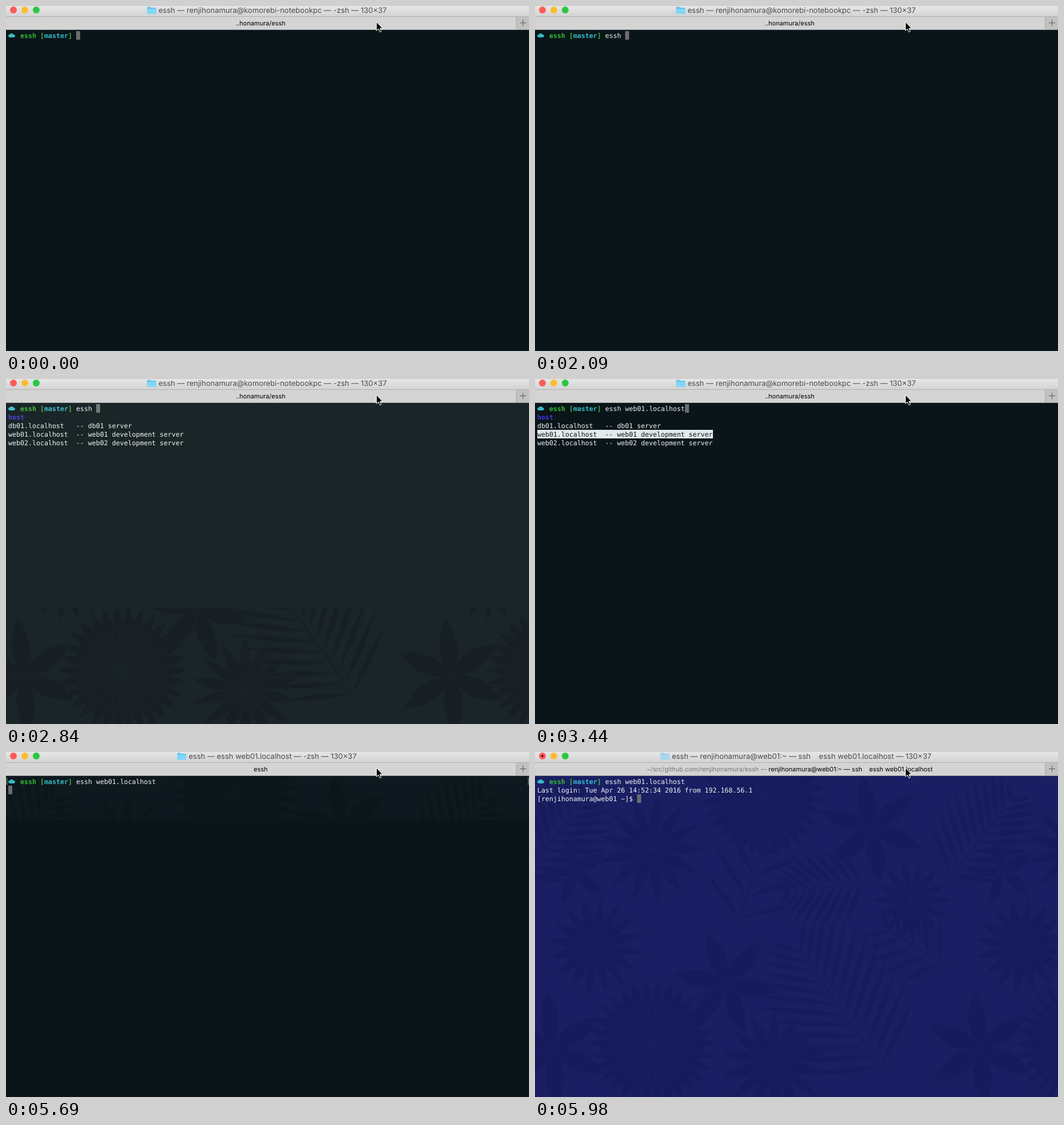
These frames come from a looping animation (917 px wide and 604 px high, 8 s). An HTML page:

```html
<!DOCTYPE html>
<html lang="en">
<head>
<meta charset="utf-8">
<title>Terminal session</title>
<style>
html, body { margin: 0; width: 100%; height: 100%; overflow: hidden; background: #0a1519; }
svg { display: block; }
text { white-space: pre; text-rendering: geometricPrecision; }
.ui { font-family: Inter, "Open Sans", sans-serif; text-anchor: middle; }
#title { font-size: 13px; fill: #4a4a4a; }
#tab { font-size: 11px; fill: #000; }
#screen { font: 11.628px "DejaVu Sans Mono", monospace; fill: #f1f4f4; }
.b { font-weight: bold; }
</style>
</head>
<body>
<svg width="917" height="604" viewBox="0 0 917 604">
  <defs>
    <linearGradient id="bar" x2="0" y2="1">
      <stop stop-color="#e6e6e6"/><stop offset="1" stop-color="#d3d3d3"/>
    </linearGradient>
    <clipPath id="clip"><rect id="clipBox" width="917"/></clipPath>
  </defs>

  <rect width="917" height="604" fill="#0a1519"/>
  <g id="foliage" clip-path="url(#clip)">
    <rect id="ground" y="42" width="917" height="562" stroke="none"/>
    <g id="tile"></g>
    <use href="#tile" x="750"/>
    <use href="#tile" x="-750"/>
  </g>
  <g id="screen"></g>
  <rect id="flash" y="42" width="917" height="562" fill="#fff"/>

  <rect width="917" height="18" fill="url(#bar)"/>
  <rect y="18" width="917" height="24" fill="#d4d4d4"/>
  <rect x="894" y="18" width="23" height="24" fill="#c1c1c1"/>
  <path d="M0 18.5H917M894.5 18V42" stroke="#b0b0b0"/>
  <path d="M0 41.5H917" stroke="#9c9c9c"/>
  <path d="M901 29.5H912M906.5 24V35" stroke="#5a5a5a"/>
  <circle cx="13" cy="7" r="6" fill="#fc5b57"/>
  <circle id="dot" cx="13" cy="7" r="2" fill="#5a0906"/>
  <circle cx="33" cy="7" r="6" fill="#fdbc2f"/>
  <circle cx="53" cy="7" r="6" fill="#29c840"/>
  <g id="folder">
    <path d="M0 3q0-1.5 1.5-1.5H5.5L7 3H14.5Q16 3 16 4.5V12Q16 13.5 14.5 13.5H1.5Q0 13.5 0 12Z" fill="#62c3ee"/>
    <path d="M0 5H16V12Q16 13.5 14.5 13.5H1.5Q0 13.5 0 12Z" fill="#84d6f9"/>
  </g>
  <text id="title" class="ui" x="467.5" y="12"></text>
  <text id="tab" class="ui" x="446.5" y="34"></text>
  <path d="M649.5 28V43.2L653 40L655.5 45.6L658 44.5L655.6 39.1H660.3Z" fill="#000" stroke="#fff"/>
</svg>

<script>
const $ = id => document.getElementById(id);
const LOOP = 8000, CELL = 7, ROW = 15, LEFT = 4, TOP = 44;
const GAP = "\u00a0".repeat(4);
const USER = "renjihonamura";

// ---- foliage behind the terminal ----
const polar = (x, y, deg, r) =>
  [x + r * Math.cos(deg * Math.PI / 180), y + r * Math.sin(deg * Math.PI / 180)];

function leaf(x, y, deg, len, wide) {
  const [mx, my] = polar(x, y, deg, len * 0.45);
  return `M${x} ${y}Q${polar(mx, my, deg + 90, wide)} ${polar(x, y, deg, len)}` +
    `Q${polar(mx, my, deg - 90, wide)} ${x} ${y}Z`;
}

function flower(x, y, deg, len, count) {
  let d = "";
  for (let i = 0; i < count; i++) d += leaf(x, y, deg + i * 360 / count, len, len * 0.33);
  return d;
}

function fan(x, y, deg, len, count) {
  let d = "";
  for (let i = 0; i < count; i++) d += leaf(x, y, deg + i * 360 / count, len, len * 0.2);
  return d;
}

function fern(x, y, deg, len, count) {
  let d = leaf(x, y, deg, len, 4);
  for (let i = 1; i < count; i++) {
    const k = i / count, [px, py] = polar(x, y, deg, len * k);
    const size = len * 0.55 * Math.sin(Math.PI * (0.25 + 0.7 * k));
    for (const side of [-1, 1]) d += leaf(px, py, deg + side * (62 - 25 * k), size, 10);
  }
  return d;
}

const plants = [
  [fan, 205, 510, 0, 115, 30],
  [fan, 400, 75, 5, 112, 30],
  [fan, 105, 340, 8, 85, 16],
  [fan, 660, 260, 0, 70, 14],
  [fan, 205, 170, 0, 95, 13],
  [fan, 420, 545, 12, 95, 14],
  [fern, 620, 570, -125, 290, 13],
  [fern, 590, 225, 172, 160, 10],
  [fern, 720, 230, -52, 200, 11],
  [fern, 345, 325, -70, 190, 5],
  [fern, 735, 380, -150, 160, 6],
  [flower, 590, 135, 20, 95, 6],
  [flower, 335, 405, 10, 95, 6],
  [flower, 30, 520, 25, 100, 6],
  [flower, 70, 210, 40, 62, 5]
];
$("tile").innerHTML = plants.map(([draw, ...at]) => `<path d="${draw(...at)}"/>`).join("");

// ---- terminal rows ----
const colX = n => LEFT + n * CELL;
const rowText = (row, col, s, attr = "") =>
  `<text x="${colX(col)}" y="${TOP + 12 + row * ROW}" ${attr}>${s}</text>`;
const box = (row, col, cols, fill) =>
  `<rect x="${colX(col)}" y="${TOP + row * ROW}" width="${cols * CELL}" height="${ROW}" fill="${fill}"/>`;

const prompt =
  `<path d="M6.5 55Q4 54.5 4 52Q4.3 49.8 6.7 49.7Q8 47.8 10.2 48Q12.3 48.2 13 49.7Q15.8 50 16 52.2Q15.8 54.6 13.5 55Z" fill="#38b9c7"/>` +
  rowText(0, 3, `essh [<tspan fill="#33bbc8">master</tspan>]`, 'class="b" fill="#32bc32"');
const marks =
  `<path d="M3 46.5H1.5V56.5H3M914.5 46.5H916V56.5H914.5" fill="none" stroke="#90979a"/>`;

const hosts = [
  "db01.localhost   -- db01 server",
  "web01.localhost  -- web01 development server",
  "web02.localhost  -- web02 development server"
];

function hostList(pick) {
  return rowText(1, 0, "host", 'class="b" fill="#4a31e0"') + hosts.map((s, i) =>
    i === pick
      ? box(i + 2, 0, s.length, "#e3eaec") + rowText(i + 2, 0, s, 'fill="#0a1519"')
      : rowText(i + 2, 0, s)).join("");
}

const login = [
  "Last login: Tue Apr 26 14:52:34 2016 from 192.168.56.1",
  `[${USER}@web01 ~]$ `
];

// ---- timeline: each step changes only what it names ----
const db = "essh db01.localhost", web1 = "essh web01.localhost", web2 = "essh web02.localhost";
const night = { y: 42, h: 562, ground: "#0a1519", leaf: "#060f14" };
const blue = { y: 42, h: 562, ground: "#1a1f63", leaf: "#161b5c" };

const changes = [
  [0, {
    typed: "", list: false, pick: -1, cursor: null, marks: false, login: false,
    scene: null, flash: 0, busy: false,
    title: `essh — ${USER}@komorebi-notebookpc — -zsh — 130×37`,
    tab: "..honamura/essh"
  }],
  [900, { typed: "e" }],
  [1350, { typed: "es" }],
  [1650, { typed: "ess" }],
  [1790, { typed: "essh" }],
  [2090, { typed: "essh " }],
  [2690, { list: true, flash: 0.2, scene: night }],
  [2840, { flash: 0.065, scene: { ...night, y: 400, h: 204 } }],
  [2990, { flash: 0, scene: null }],
  [3140, { typed: db, pick: 0 }],
  [3440, { typed: web1, pick: 1 }],
  [4040, { typed: web2, pick: 2 }],
  [4340, { typed: web1, pick: 1 }],
  [5240, { list: false, marks: true, scene: { y: 42, h: 77, ground: "#0e191f", leaf: "#0b151a" } }],
  [5690, { cursor: [1, 0], title: `essh — ${web1} — -zsh — 130×37`, tab: "essh" }],
  [5830, {
    marks: false, scene: blue, busy: true,
    title: `essh — ssh${GAP}${web1} — 130×37`, tab: `ssh${GAP}${web1}`
  }],
  [5980, {
    login: true, cursor: [2, login[1].length],
    title: `essh — ${USER}@web01:~ — ssh${GAP}${web1} — 130×37`,
    tab: `<tspan fill="#777">~/src/github.com/${USER}/essh — </tspan>${USER}@web01:~ — ssh${GAP}${web1}`
  }]
];
let last = {};
const steps = changes.map(([at, change]) => ({ at, ...(last = { ...last, ...change }) }));

function render(s) {
  const [row, col] = s.cursor || [0, 17 + s.typed.length];
  $("screen").innerHTML = prompt + box(row, col, 1, "#6a6c6d") + rowText(0, 17, s.typed) +
    (s.list ? hostList(s.pick) : "") +
    (s.marks ? marks : "") +
    (s.login ? login.map((t, i) => rowText(i + 1, 0, t)).join("") : "");

  const scene = s.scene;
  $("foliage").style.display = scene ? "" : "none";
  if (scene) {
    $("clipBox").setAttribute("y", scene.y);
    $("clipBox").setAttribute("height", scene.h);
    $("ground").setAttribute("fill", scene.ground);
    $("foliage").setAttribute("fill", scene.leaf);
    $("foliage").setAttribute("stroke", scene.ground);
  }
  $("flash").setAttribute("opacity", s.flash);
  $("dot").style.display = s.busy ? "" : "none";
  $("title").textContent = s.title;
  $("tab").innerHTML = s.tab;
  const left = 467.5 - $("title").getComputedTextLength() / 2 - 20;
  $("folder").setAttribute("transform", `translate(${left.toFixed(1)})`);
  $("folder").setAttribute("opacity", s.busy ? 0.6 : 1);
}

let shown = null;
const start = performance.now();
function tick() {
  const t = (performance.now() - start) % LOOP;
  const step = steps.findLast(s => s.at <= t) || steps[0];
  if (step !== shown) render(shown = step);
  requestAnimationFrame(tick);
}
tick();
</script>
</body>
</html>
```
